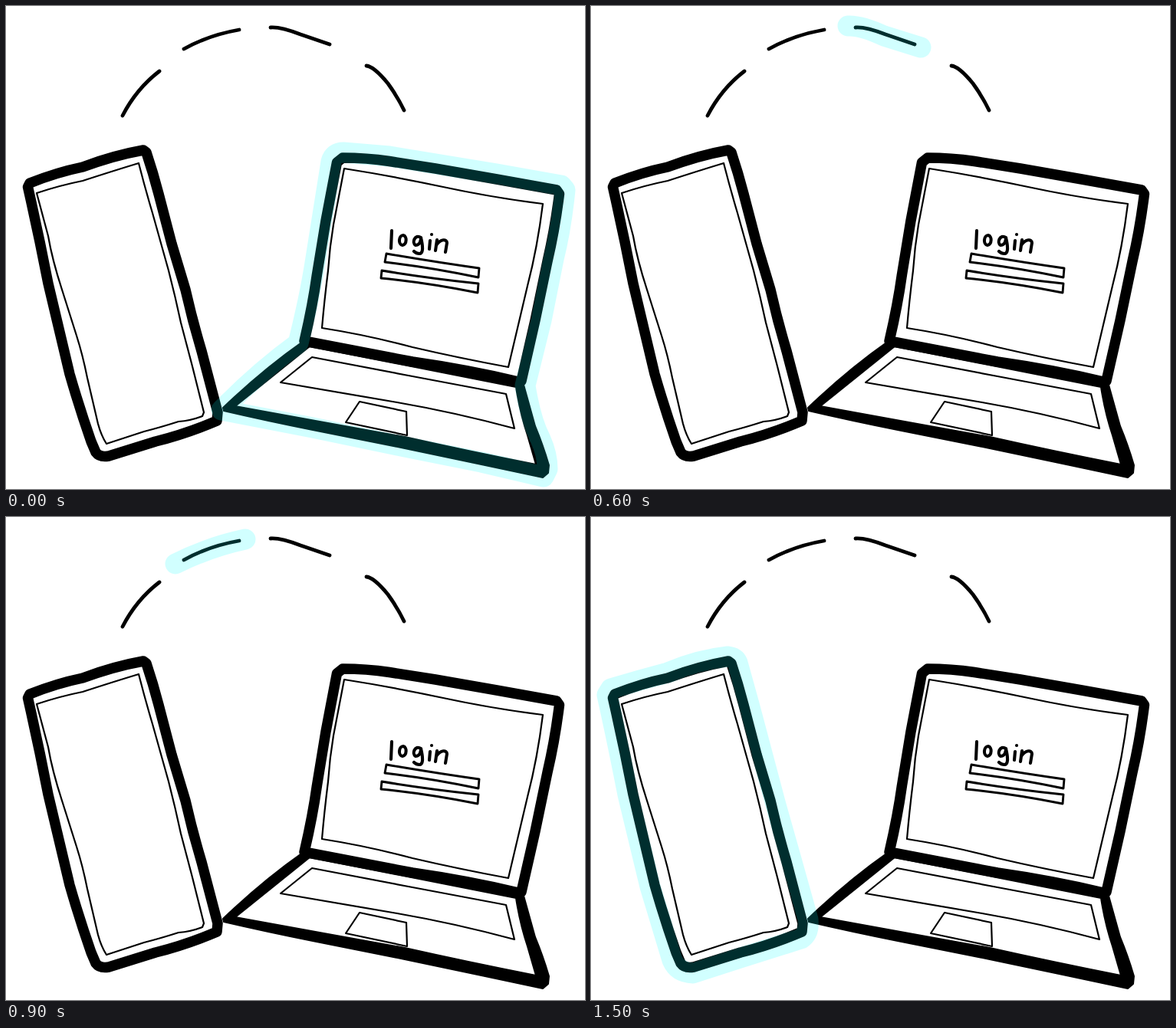
Animation of 755 by 630 pixels, one loop 1.8 s. Source, as an HTML page:

```html
<!DOCTYPE html>
<html lang="en">
<head>
<meta charset="utf-8">
<title>Login transfer</title>
<style>
html, body { margin: 0; width: 100%; height: 100%; overflow: hidden; background: #fff; }
svg { display: block; width: 755px; height: 630px; }
path { stroke-linecap: round; stroke-linejoin: round; }
.ink { fill: none; stroke: #000; }
.frame { stroke-width: 13.5; }
.thin { stroke-width: 2.2; }
.dash { stroke-width: 4.8; }
.word { stroke-width: 4.1; }
.base { stroke: #000; stroke-width: 2; }
.glow path { fill: none; stroke: #0ff; stroke-opacity: .18; stroke-width: 27; visibility: hidden; }
</style>
</head>
<body>
<svg viewBox="0 0 755 630" role="img" aria-label="A login passing from a laptop to a phone">
  <!-- phone -->
  <g class="ink">
    <path class="frame" d="M28.5 236L31 231Q66 217 100 210Q140 195 179 188L183 191Q192 218 199 245L216 310L234 370Q243 410 255 450L276 530L275 541Q235 558 195 568L134 587Q122 589 117 582L111 568Q96 525 83 480L55 362Q43 300 28.5 236Z"/>
    <path class="thin" d="M40 244Q70 234 100 228Q140 215 173 205Q182 240 191 270L212 345Q221 380 228 413L243 470L258 530L256 535Q240 541 225 542Q200 550 180 555L131 571Q124 560 120 545L106 485Q100 455 92 430L73 370Q60 330 55 300L40 244"/>
  </g>

  <!-- laptop -->
  <path class="base" fill-rule="evenodd" d="M388 437Q335 474 283 524L284 528Q340 541 400 553L520 577L620 598L700 615L707 609L708 599Q700 572 690 548L675 494ZM396 444L665 497Q670 530 680 560L691 598Q600 580 520 562L420 544L299 522Q345 485 396 444Z"/>
  <g class="ink">
    <path class="frame" d="M389 437Q400 390 405.5 350L417 280L431.5 204L439 198Q470 198 500 202.5L560 212L640 226L718 240L721.5 245Q716 290 706 333L690 410L672 489L668 490Q600 474 530 464Z"/>
    <path class="thin" d="M441 212Q505 222 570 236Q635 250 700 258Q693 315 680 365L655 471Q590 459 530 445Q470 429 412 420Q415 385 420 345Q422 315 427 285Z"/>
    <path class="thin" d="M399 458L530 483L652 506L663 551Q585 530 510 517L358 491ZM461 516L522 529L523 560L443 543Z"/>
    <path stroke-width="2.9" d="M496 323Q560 334 617 342L616 354Q555 341 494 334ZM490 345Q550 355 616 362L615 374Q550 361 489 355Z"/>
    <!-- handwritten "login" -->
    <path class="word" d="M503 293L502 316M518 299C512 299 511 311 517 312C523 311 523 300 518 299M541 302C533 297 529 309 534 312C539 312 541 307 541 302Q546 323 539 323Q535 323 532 320M553 306L552 317M555 298L555.1 298M562 305L560 319M561 312C567 303 575 304 575 309L573 321"/>
  </g>

  <!-- arc of dashes -->
  <path class="ink dash" d="M152 143Q170 108 200 85M232 56Q264 38 304 31M345 28Q358 27 384 37L422 50M470 78Q480 79 498 101Q511 119 519 136"/>

  <!-- highlights, in playing order -->
  <g class="glow">
    <path d="M381 440Q396 380 403 335L424 203Q427 191 440 191L500 196L640 219L724 234L729 240Q724 290 714 330L698 410L677 495Q684 540 697 565Q706 585 706 604L701 614L620 595L520 575L400 550L281 527Q330 477 381 440Z"/>
    <path d="M463 74Q491 89 506 111L525 143"/>
    <path d="M335 26Q352 25 382 39L430 54"/>
    <path d="M221 61Q265 39 312 29"/>
    <path d="M147 147Q168 108 203 83"/>
    <path d="M21 232L26 224Q62 213 100 203Q140 186 178 182Q188 183 191 190L206 244L240 372L262 450L283 525Q285 543 274 550L195 575L133 595Q113 594 106 578L77 482L48 362Q36 300 21 232Z"/>
  </g>
</svg>
<script>
const STEP = 300;
const glows = [...document.querySelectorAll('.glow path')];

function draw(now) {
  const active = Math.floor(now / STEP) % glows.length;
  glows.forEach((glow, i) => glow.style.visibility = i === active ? 'visible' : 'hidden');
}

const start = performance.now();
function tick() {
  draw(performance.now() - start);
  requestAnimationFrame(tick);
}
tick();
</script>
</body>
</html>
```
